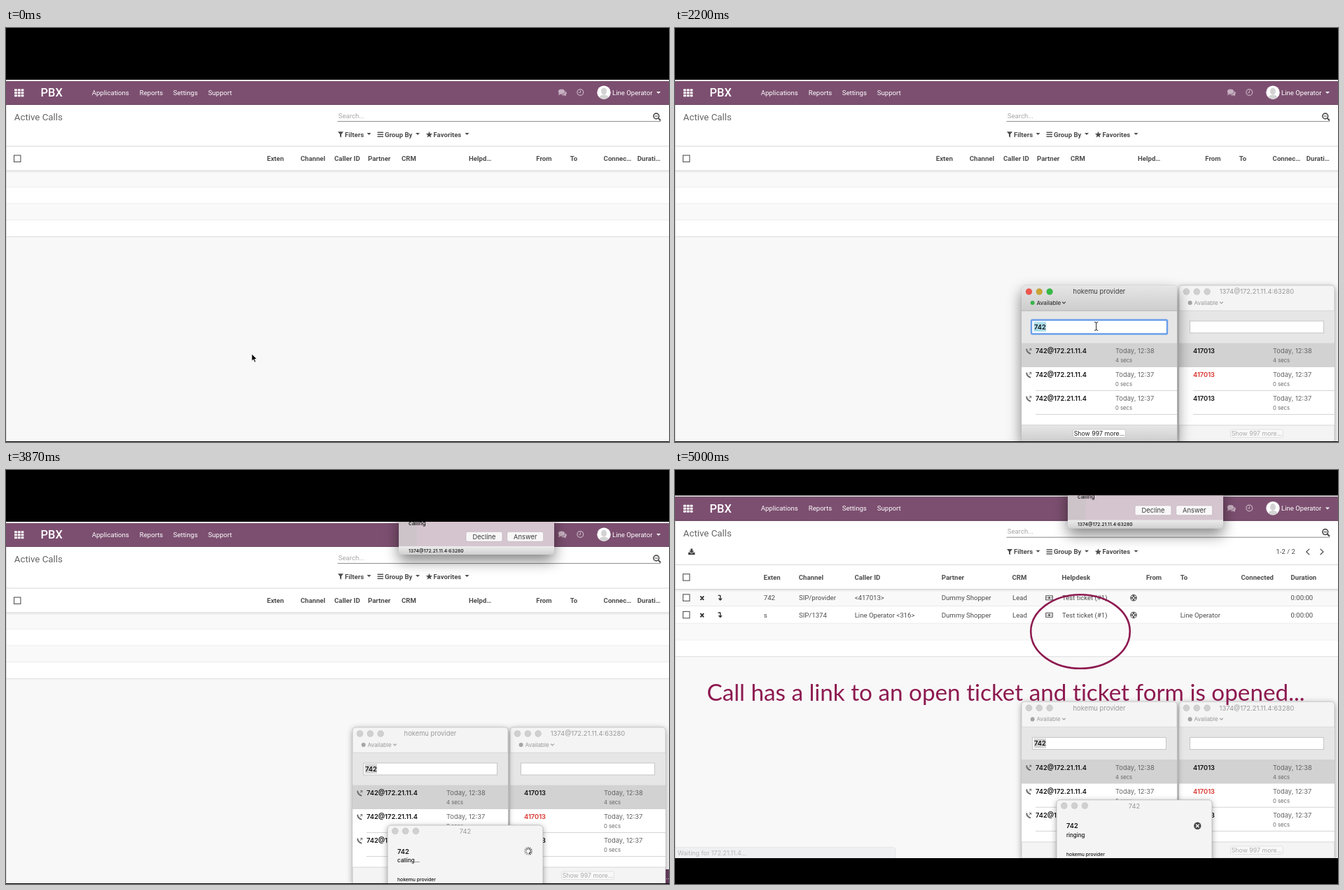
Write an HTML page that moves like this. It is 947 by 592 pixels and loops after 8000 ms.

```html
<!DOCTYPE html>
<html lang="en">
<head>
<meta charset="utf-8">
<title>Active Calls</title>
<style>
  html, body { margin: 0; width: 100%; height: 100%; overflow: hidden; background: #000; }
  svg { display: block; width: 100%; height: 100%; }
  text { font: 9.6px Roboto, sans-serif; fill: #4c4c4c; white-space: pre; }
  .nav { fill: #fff; }
  .brand { font-size: 16.4px; font-weight: 500; fill: #fff; }
  .head { font-size: 13.3px; fill: #666; }
  .hint { fill: #a5a5a5; }
  .bold { font-weight: 700; }
  .mac { font: 9.4px Inter, sans-serif; fill: #3c3c3c; }
  .strong { font: 600 9.3px Inter, sans-serif; fill: #111; }
  .missed { font: 600 9.3px Inter, sans-serif; fill: #d8322c; }
  .dim { font: 9.4px Inter, sans-serif; fill: #999; }
  .date { font: 9.4px Inter, sans-serif; fill: #666; }
  .note { font: 7.7px Inter, sans-serif; fill: #666; }
  .stat { font: 500 8.1px Inter, sans-serif; fill: #333; }
  .statDim { font: 8.1px Inter, sans-serif; fill: #999; }
  .btn { font: 8.8px Inter, sans-serif; fill: #222; }
  .btnDim { font: 8.8px Inter, sans-serif; fill: #aaa; }
  .call { font: 500 7.9px Inter, sans-serif; fill: #111; }
  .tiny { font: 500 6.8px Inter, sans-serif; fill: #111; }
  .wait { font: 8.9px Inter, sans-serif; fill: #3c4248; }
  .caption { font: 33.25px Lato, sans-serif; fill: #8d1a50; font-variant-ligatures: none; }
  .deep { filter: drop-shadow(0 9px 10px rgba(0,0,0,.48)); }
  .soft { filter: drop-shadow(0 2px 4px rgba(0,0,0,.35)); }
</style>
</head>
<body>
<svg id="stage" viewBox="0 0 947 592" preserveAspectRatio="none"></svg>
<script>
const LOOP = 8000;
const USER = 'Line Operator', CLIENT = 'Dummy Shopper';
const EXT = '742', LINE = '1374', CALLER = '417013', HOST = '172.21.11.4';
const PROVIDER = 'hokemu provider', ACCOUNT = `${LINE}@${HOST}:63280`;

const esc = s => s.replace(/</g, '&lt;').replace(/>/g, '&gt;');
const text = (x, y, s, cls = '', anchor = 'start') =>
  `<text x="${x}" y="${y}" class="${cls}" text-anchor="${anchor}">${esc(s)}</text>`;
const rect = (x, y, w, h, fill, extra = '') =>
  `<rect x="${x}" y="${y}" width="${w}" height="${h}" fill="${fill}" ${extra}/>`;
const path = (d, fill, extra = '') => `<path d="${d}" fill="${fill}" ${extra}/>`;
const stroke = (d, color, width = 1) =>
  path(d, 'none', `stroke="${color}" stroke-width="${width}" stroke-linecap="round" stroke-linejoin="round"`);
const circle = (x, y, r, fill, extra = '') => `<circle cx="${x}" cy="${y}" r="${r}" fill="${fill}" ${extra}/>`;
const line = (x, y, x2, color, w = 1) => rect(x, y - w / 2, x2 - x, w, color);
const group = (id, body) => `<g id="${id}">${body}</g>`;
const range = n => [...Array(n).keys()];
const drop = (x, y, fill) => path(`M${x} ${y}h6l-3 3z`, fill);

function navBar() {
  const grid = range(9).map(i =>
    rect(12 + i % 3 * 4.8, 87.2 + Math.floor(i / 3) * 4, 3.8, 3, '#fff', 'rx=".5"')).join('');
  const menu = [[122.7, 'Applications'], [190.8, 'Reports'], [238.8, 'Settings'], [288.8, 'Support']];
  const faint = '#c7b1c1';
  return rect(0, 73, 947, 3, '#f3eef2') + rect(0, 76, 947, 34, '#7c4f70') +
    rect(0, 109, 947, 1, '#6d4463') + grid + text(49.6, 98.2, 'PBX', 'brand') +
    menu.map(([x, s]) => text(x, 96, s, 'nav')).join('') +
    `<ellipse cx="793.5" cy="91" rx="4.6" ry="3.4" fill="${faint}"/>` +
    path('M790 93l-1 3.2 4-2z', faint) +
    path('M798.8 90c2.6 1.8 2.4 4.4.6 5.4l.8 2-3-1.2c-1.8.3-3.2 0-4.2-.8 3.4.2 6-1.8 5.8-5.4z', faint) +
    circle(820.3, 92, 4.4, 'none', `stroke="${faint}" stroke-width="1.2"`) +
    stroke('M820.5 89.6v2.8h-2', faint) +
    circle(854, 92.2, 9.7, '#fff') +
    '<ellipse cx="854" cy="90.5" rx="4" ry="5" fill="#d3d3d3"/>' +
    path('M847.5 98.5q2-3 6.500-3t6.5 3q-2.5 3.1-6.5 3.1t-6.5-3.1z', '#d3d3d3') +
    text(866, 96, USER, 'nav') + drop(929, 91, '#fff');
}

function searchBar() {
  const c = '#4c4c4c';
  return text(11.8, 132.3, 'Active Calls', 'head') + text(474.8, 128.6, 'Search...', 'hint') +
    line(473.5, 133.6, 935, '#8a8a8a') +
    circle(928.8, 126, 3.9, 'none', `stroke="${c}" stroke-width="1.6"`) +
    stroke('M931.9 129.1l2.6 2.6', c, 2) + stroke('M927 126h3.6', c, 1.1);
}

// Filter row, drawn for a middle line at y
function filters(y) {
  const c = '#4c4c4c';
  const star = range(10).map(i => {
    const r = i % 2 ? 2.1 : 4.9, a = i * Math.PI / 5;
    return `${604.5 + r * Math.sin(a)},${y + .3 - r * Math.cos(a)}`;
  }).join(' ');
  return path(`M474 ${y - 4}h8l-3 3.8v4.6l-2-1.6v-3z`, c) + text(484, y + 3.5, 'Filters', 'bold') +
    [-3, 0, 3].map(d => line(530.5, y + d, 539, c, 1.4)).join('') +
    text(541, y + 3.5, 'Group By', 'bold') + `<polygon points="${star}" fill="${c}"/>` +
    text(610.5, y + 3.5, 'Favorites', 'bold') +
    [515.5, 585, 655.5].map(x => drop(x, y - 2.2, c)).join('');
}

const box = y => rect(11.5, y - 4.7, 9.4, 9.4, '#fff', 'stroke="#555" stroke-width="1.1"');

// Table body: header from `top` to `first`, then striped rows ending at `edges`
function grid(top, first, edges, cols) {
  const ys = [first, ...edges];
  const mid = (top + first) / 2;
  return rect(0, 110, 947, first - 110, '#fff') + rect(0, first, 947, 400, '#f8f8f8') +
    edges.map((y, i) => rect(0, ys[i], 947, y - ys[i], i % 2 ? '#fff' : '#f9f9f9') +
      line(0, y, 947, '#dcdde0')).join('') +
    line(0, top - .5, 947, '#d6d6d6') + line(0, first, 947, '#d0d0d0') +
    rect(0, first + .5, 947, 3, 'url(#under)') + box(mid) +
    cols.map(([x, s]) => text(x, mid + 3.3, s, 'bold')).join('');
}

function callRow(y, cells) {
  const c = '#4c4c4c';
  return box(y) + stroke(`M36.8 ${y - 1.5}l3.8 4.2m0-4.2l-3.8 4.2`, '#333', 1.9) +
    stroke(`M62 ${y - 3.2}h2.7v6.4m-1.9-1.8l1.9 2 1.9-2`, '#333', 1.4) +
    rect(529.7, y - 2.7, 9.6, 5.9, 'none', `stroke="${c}"`) +
    circle(534.5, y + .2, 1.6, c) + circle(531.3, y + .2, .7, c) + circle(537.7, y + .2, .7, c) +
    circle(655, y + .3, 4.2, 'none', `stroke="${c}" stroke-width="1.1"`) +
    circle(655, y + .3, 1.9, 'none', `stroke="${c}"`) +
    stroke(`M651.5 ${y + .3}h1.4m4.2 0h1.4M655 ${y - 3.2}v1.4m0 4.2v1.4`, c, 1.8) +
    cells.map(([x, s]) => text(x, y + 3.4, s)).join('');
}

const emptyTable = () =>
  grid(169.5, 204, [227.5, 251.3, 275, 298.5], [[372.8, 'Exten'], [420.8, 'Channel'],
    [469, 'Caller ID'], [517, 'Partner'], [565, 'CRM'], [661, 'Helpd…'], [757.3, 'From'],
    [805.7, 'To'], [853.6, 'Connec…'], [901.8, 'Durati…']]) + filters(152.3);

function fullTable() {
  const shared = [[380.8, CLIENT], [482, 'Lead'], [553, 'Test ticket (#1)'], [879.6, '0:00:00']];
  const c = '#555';
  return grid(173.3, 208, [232, 256.4, 280.3, 303.7], [[126.5, 'Exten'], [176.8, 'Channel'],
    [256.6, 'Caller ID'], [380.8, 'Partner'], [481.5, 'CRM'], [552.6, 'Helpdesk'],
    [673, 'From'], [721.7, 'To'], [808.6, 'Connected'], [879.6, 'Duration']]) +
    callRow(219.7, [[126.8, EXT], [177, 'SIP/provider'], [256.7, `<${CALLER}>`], ...shared]) +
    callRow(244.2, [[126.8, 's'], [177, `SIP/${LINE}`], [256.7, `${USER} <316>`], ...shared, [721.7, USER]]) +
    filters(154.3) + text(858.5, 157.8, '1-2 / 2') +
    stroke('M905.8 150.5l-4 3.8 4 3.8', c, 1.3) + stroke('M922 150.5l4 3.8-4 3.8', c, 1.3) +
    path('M22.3 149.8h2.8v3h2.3l-3.7 3.5-3.7-3.5h2.3z', '#444') +
    path('M19 155.2h2.5l2.2 1.8 2.2-1.8h2.5v3.3h-9.4z', '#444');
}

const lights = (x, y, colors) => colors.map((c, i) =>
  circle(x + i * 14.8, y, 4.5, c, 'stroke="#000" stroke-opacity=".12" stroke-width=".6"')).join('');
const GRAY = ['#d0d0d0', '#d0d0d0', '#d0d0d0'];

const phone = y => stroke(`M502.3 ${y - 2.5}q.3 4.5 5 6`, '#666', 1.9) +
  stroke(`M505.6 ${y - .3}l3-3m-2.2 0h2.2v2.2`, '#666', .9);

// Softphone window at x; `on` draws it with focus
function softphone(x, title, on, entries, value) {
  const right = x + 222;
  const rows = entries.map(([s, cls, stamp, secs], i) => {
    const y = 465.3 + i * 34;
    return (i ? line(x + 20, y + 19.2, right, '#d5d5d5') : '') + (value ? phone(y - 3.3) : '') +
      text(x + 20, y, s, cls) + text(x + 134, y, stamp, 'date') + text(x + 134, y + 12.7, secs, 'note');
  }).join('');
  const field = on
    ? rect(x + 14, 417.5, 194, 20, '#fff', 'rx="1.5" stroke="#6a9eea" stroke-width="2.4"')
    : rect(x + 15.5, 419, 191, 17, '#fff', 'stroke="#c6c6c6"');
  return path(`M${x} 591v-218q0-5 5-5h212q5 0 5 5v218z`, '#f4f4f4',
      `class="${on ? 'deep' : 'soft'}" stroke="#b5b5b5" stroke-width=".6"`) +
    (on ? path(`M${x} 404v-31q0-5 5-5h212q5 0 5 5v31z`, 'url(#bar)') : '') +
    line(x, 404.3, right, on ? '#b4b4b4' : '#d4d4d4') +
    rect(x, 405, 222, 45.5, '#e6e6e6') + field +
    (value ? rect(x + 17.5, 420.5, 17.5, 13.5, on ? '#a9dbe9' : '#d3d3d3') +
      text(x + 18, 431, value, 'strong') : '') +
    rect(x, 450.5, 222, 34.5, '#d2d2d2') + rect(x, 485, 222, 83, '#fff') + rows +
    line(x, 568, right, on ? '#bdbdbd' : '#d8d8d8') + (on ? rect(x, 568.5, 222, 23, 'url(#bar)') : '') +
    rect(x + 73.5, 574, 75, 11.5, on ? '#fff' : '#f8f8f8',
      `rx="2.5" stroke="${on ? '#bbb' : '#d8d8d8'}" stroke-width=".7"`) +
    text(x + 111, 583.2, 'Show 997 more...', on ? 'btn' : 'btnDim', 'middle') +
    lights(x + 10.5, 377, on ? ['#f0544d', '#c9a534', '#35bb46'] : GRAY) +
    text(x + 111, 380.4, title, on ? 'mac' : 'dim', 'middle') +
    circle(x + 15.6, 393, 3, on ? '#38b54a' : '#a5a5a5') +
    text(x + 21.5, 396, 'Available', on ? 'stat' : 'statDim') +
    stroke(`M${x + 58.5} 391.8l2 2 2-2`, on ? '#333' : '#999', 1.1);
}

function callWindow(on) {
  return path('M545 593v-80q0-5 5-5h212q5 0 5 5v80z', on ? '#cfcfcf' : '#f4f4f4',
      `class="${on ? 'deep' : 'soft'}" stroke="#aaa" stroke-width=".6"`) +
    (on ? rect(545, 522, 222, 57.5, '#d5c5cf') + rect(545, 579.5, 222, 12, 'url(#foot)') : '') +
    lights(555.8, 516.3, on ? ['#f0544d', '#c9a93c', '#c9c9c9'] : GRAY) +
    text(656, 519.8, EXT, on ? 'mac' : 'dim', 'middle') +
    text(559, 548.6, EXT, 'strong') + text(559, 587.6, PROVIDER, 'tiny');
}

function popup() {
  const button = (x, w, s) =>
    rect(x, 88.3, w, 14, '#f8f6f7', 'rx="2.5" stroke="#bfb3bb" stroke-width=".7"') +
    text(x + w / 2, 98.8, s, 'mac', 'middle');
  return path('M561 60h222v56q0 5-5 5h-212q-5 0-5-5z', '#d5c5cf', 'class="deep"') +
    rect(561, 74, 26, 35, '#cdc4c9') +
    path('M561 109h222v7q0 5-5 5h-212q-5 0-5-5z', 'url(#foot)') +
    text(575, 79, 'calling', 'call') + button(657, 52, 'Decline') + button(715.7, 52, 'Answer') +
    text(575, 117.6, ACCOUNT, 'tiny');
}

const spokes = range(12).map(i =>
  `<path d="M0-3v-2.6" stroke="#222" stroke-width="1.2" stroke-linecap="round" opacity="${.35 + i * .055}" transform="rotate(${i * 30})"/>`).join('');

const stamps = [['Today, 12:38', '4 secs'], ['Today, 12:37', '0 secs'], ['Today, 12:37', '0 secs']];
const outgoing = stamps.map(s => [`${EXT}@${HOST}`, 'strong', ...s]);
const incoming = stamps.map((s, i) => [CALLER, i === 1 ? 'missed' : 'strong', ...s]);
const fade = (id, a, b) =>
  `<linearGradient id="${id}" x2="0" y2="1"><stop stop-color="${a}"/><stop offset="1" stop-color="${b}"/></linearGradient>`;

document.getElementById('stage').innerHTML =
  `<defs>${fade('bar', '#e6e6e6', '#cdcdcd')}${fade('foot', '#ececec', '#d0d0d0')}${fade('under', '#e6e6e6', '#f9f9f9')}
    <clipPath id="view"><rect y="74" width="947" height="517"/></clipPath></defs>` +
  rect(0, 0, 947, 592, '#000') +
  group('screen', '<g clip-path="url(#view)">' +
    group('empty', emptyTable()) + group('full', fullTable()) + navBar() + searchBar() +
    group('caret', rect(474, 119, 1.2, 12, '#333')) +
    rect(0, 110, .6, 482, '#c8c8c8') +
    group('toast', rect(930, 571, 17, 21, '#6a3f62') + text(942.5, 585, '..', 'nav')) +
    group('phones',
      softphone(720, ACCOUNT, false, incoming, '') +
      group('dialOn', softphone(495, PROVIDER, true, outgoing, EXT) +
        group('fieldCaret', rect(528.5, 420.5, 1.2, 13.5, '#222')) +
        stroke('M599.5 420.5q2 0 2.2 1.5 .2-1.5 2.2-1.5m-2.2 1.5v9m-2.2 1.5q2 0 2.2-1.5 .2 1.5 2.2 1.5', '#222')) +
      group('dialOff', softphone(495, PROVIDER, false, outgoing, EXT))) +
    group('callOn', callWindow(true)) + group('callOff', callWindow(false)) +
    group('calling', text(559, 561, 'calling...', 'call') +
      `<g transform="translate(746 545)">${group('spin', spokes)}</g>`) +
    group('ringing', text(559, 561, 'ringing', 'call') + circle(746.3, 545, 5.2, '#484848') +
      stroke('M744.4 543.1l3.8 3.8m0-3.8l-3.8 3.8', '#fff', 1.3)) +
    group('popup', popup()) +
    group('status', path('M-1 592v-16.3h312q4 0 4 4v12.3z', '#dee3e8', 'stroke="#b4b9be" stroke-width=".8"') +
      text(3.8, 587, `Waiting for ${HOST}...`, 'wait')) +
    group('mouse', path('M0 0v10.3l2.4-2.2 1.7 4 1.8-.8-1.7-3.8h3.3z', '#000', 'stroke="#fff" stroke-width=".8"')) +
    '</g>') +
  group('mark', '<ellipse cx="579" cy="231" rx="70.8" ry="52.8" fill="none" stroke="#8d1a50" stroke-width="2.6"/>' +
    text(45.5, 329.5, 'Call has a link to an open ticket and ticket form is opened...', 'caption'));

const el = {};
document.querySelectorAll('g[id]').forEach(g => el[g.id] = g);

const pointer = [[0, 351, 466], [70, 388, 538], [130, 406, 563.5], [530, 419, 563.5], [600, 432, 563]];
const ticks = [3400, 3470, 3530, 3670, 3730, 3870, 3930, 4000, 4070];

function draw(t) {
  const within = (a, b = LOOP) => t >= a && t < b;
  const shown = {
    empty: within(0, 4130), full: within(4130),
    caret: within(270, 800) || within(1270, 1800),
    mouse: within(0, 2200), phones: within(2200),
    dialOn: within(2200, 3330), dialOff: within(3330), fieldCaret: within(3000, 3330),
    callOn: within(3330, 3870), callOff: within(3870),
    calling: within(3330, 4130), ringing: within(4130),
    toast: within(3670, 4130), popup: within(3870), status: within(4200), mark: within(5000)
  };
  for (const id in shown) el[id].style.display = shown[id] ? '' : 'none';

  const [, x, y] = pointer.filter(p => p[0] <= t).pop();
  const raised = t >= 4400;
  el.mouse.setAttribute('transform', `translate(${x} ${y})`);
  el.spin.setAttribute('transform', `rotate(${ticks.filter(k => k <= t).length * 30})`);
  el.screen.setAttribute('transform', raised ? 'translate(0 -37.8) scale(1 1.003)' : '');
  el.status.setAttribute('opacity', raised ? .35 : 1);
}

const start = performance.now();
function frame() {
  draw((performance.now() - start) % LOOP);
  requestAnimationFrame(frame);
}
frame();
</script>
</body>
</html>
```
